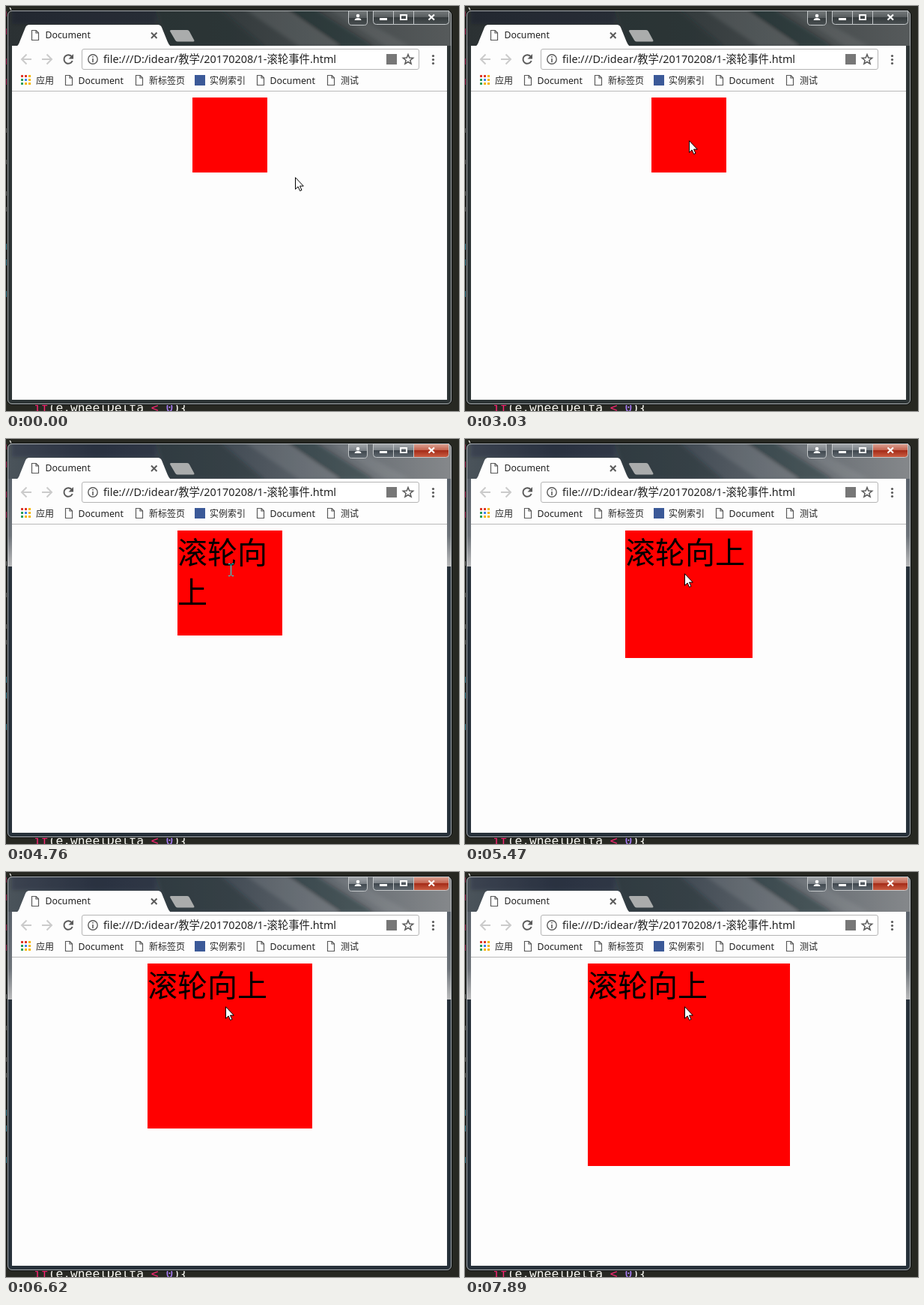
Recreate the animation shown at these times as an HTML page. Size 605 by 540 pixels, loop 8 s.

```html
<!DOCTYPE html>
<html lang="zh-CN">
<head>
<meta charset="utf-8">
<title>Wheel event</title>
<style>
html, body { margin: 0; width: 100%; height: 100%; overflow: hidden; background: #272822; }
svg { display: block; }
text { font-family: "Noto Sans", "Open Sans", "Noto Sans CJK SC", "Noto Sans CJK", sans-serif; fill: #222; white-space: pre; }
.latin { font-size: 12.3px; }
.han { font-size: 12px; }
.big { font: 40px "Noto Sans CJK SC", "Noto Sans CJK", sans-serif; fill: #000; }
.code { font: 16.3px "DejaVu Sans Mono", monospace; fill: #f8f8f2; }
.pink { fill: #f92672; }
.purple { fill: #ae81ff; }
.line { fill: none; stroke: #5a5a5a; stroke-width: 2; }
</style>
</head>
<body>
<svg width="605" height="540" viewBox="0 0 605 540">
  <defs>
    <linearGradient id="idle"><stop offset="0" stop-color="#2b3133"/><stop offset=".5" stop-color="#343b3d"/><stop offset="1" stop-color="#565a5b"/></linearGradient>
    <linearGradient id="live"><stop offset="0" stop-color="#4b545b"/><stop offset=".2" stop-color="#343e47"/><stop offset=".5" stop-color="#434c55"/><stop offset="1" stop-color="#85888b"/></linearGradient>
    <linearGradient id="side" x2="0" y2="1"><stop offset="0" stop-color="#59616a"/><stop offset=".65" stop-color="#6e747a"/><stop offset="1" stop-color="#b9babb"/></linearGradient>
    <linearGradient id="dim" x2="0" y2="1"><stop offset="0" stop-color="#777c7d"/><stop offset=".48" stop-color="#565b5d"/><stop offset=".5" stop-color="#363c3e"/><stop offset="1" stop-color="#4a5052"/></linearGradient>
    <linearGradient id="glass" x2="0" y2="1"><stop offset="0" stop-color="#a5a9ad"/><stop offset=".48" stop-color="#7a8086"/><stop offset=".5" stop-color="#40484f"/><stop offset="1" stop-color="#626a71"/></linearGradient>
    <linearGradient id="red" x2="0" y2="1"><stop offset="0" stop-color="#dca596"/><stop offset=".48" stop-color="#c4604c"/><stop offset=".5" stop-color="#a52c18"/><stop offset="1" stop-color="#cc6045"/></linearGradient>
    <clipPath id="frame"><rect x="2" y="6" width="593" height="525" rx="6"/></clipPath>
    <filter id="soft" x="-20%" width="140%"><feGaussianBlur stdDeviation="2.5"/></filter>
    <g id="page"><path d="M.5 .5H6.2L9.5 3.8V13.5H.5ZM6 .5V4H9.5" fill="#fff" stroke="#5a5a5a" stroke-width="1.2"/></g>
  </defs>

  <rect width="605" height="540" fill="#272822"/>
  <text class="code" x="-8" y="14"><tspan class="pink">a</tspan>)</text>
  <text class="code" x="37" y="541"><tspan class="pink">if</tspan>(e.wheelDelta <tspan class="pink">&lt;</tspan> <tspan class="purple">0</tspan>){</text>
  <g id="edge"></g>

  <g clip-path="url(#frame)">
    <rect id="title" x="2" y="6" width="593" height="48"/>
    <g filter="url(#soft)">
      <path d="M200 4H285L345 54H215Z" fill="#1f282d" opacity=".35"/>
      <path d="M318 4H372L445 54H392Z" fill="#fff" opacity=".09"/>
      <path d="M372 4H412L492 54H446Z" fill="#12191e" opacity=".32"/>
      <path d="M430 4H452L540 54H508Z" fill="#fff" opacity=".07"/>
      <path d="M8 4H200V24H8Z" fill="#161c20" opacity=".2"/>
    </g>
    <path id="rim" d="M2 53H8V525H589V53H595V531H2Z" fill="#2d3435"/>
    <path id="shine" d="M2 53H8V170H2ZM589 53H595V170H589Z" fill="url(#side)"/>
  </g>
  <rect x="1.5" y="5.5" width="594" height="526" rx="6.5" fill="none" stroke="#0e1112"/>
  <rect x="2.5" y="6.5" width="592" height="524" rx="5.5" fill="none" stroke="#c9cccd" stroke-opacity=".8"/>

  <g stroke="#c4c8ca" stroke-width="1">
    <path class="btn" d="M457.5 6.5H482.5V21Q482.5 25.5 478.5 25.5H461.5Q457.5 25.5 457.5 21Z"/>
    <path class="btn" d="M490.5 6.5H517.5V24.5H494.5Q490.5 24.5 490.5 20.5Z"/>
    <path class="btn" d="M517.5 6.5H544.5V24.5H517.5Z"/>
    <path id="close" d="M544.5 6.5H591.5V20.5Q591.5 24.5 587.5 24.5H544.5Z"/>
  </g>
  <g fill="#fff">
    <circle cx="470" cy="13" r="2.3"/><path d="M465.5 19Q466 16 470 16T474.5 19Z"/>
    <rect x="499" y="16" width="10" height="3"/>
  </g>
  <rect x="527" y="12" width="8" height="6" fill="none" stroke="#fff" stroke-width="2"/>
  <path d="M564.5 11.5L572 18.5M572 11.5L564.5 18.5" stroke="#fff" stroke-width="2.2"/>

  <rect x="8" y="53" width="581" height="472" fill="#fdfdfd"/>
  <path d="M14 54Q17 52 18.5 47L26 28.5Q27.5 25 31 25H203Q206.500 25 208 28.500L215.500 47Q217.500 52 220 54Z" fill="#fdfdfd"/>
  <path d="M220.500 32H242Q244 32 245 34L251.500 46Q251.500 47.500 250 47.500H229Q227 47.500 226 45.500L219 33.500Q218.500 32 220.500 32Z" fill="#aaacac"/>
  <use href="#page" x="34" y="32"/>
  <text class="latin" x="52.500" y="43">Document</text>
  <path class="line" d="M194 35.500L201.500 43M201.500 35.500L194 43" stroke-width="1.7"/>

  <path class="line" d="M34 71H21.500M27.500 64.500L21 71L27.500 77.500" style="stroke:#cbcbcb"/>
  <path class="line" d="M48 71H60.500M54.500 64.500L61 71L54.500 77.500" style="stroke:#cbcbcb"/>
  <path class="line" d="M87.500 67A5.800 5.800 0 1 0 88.700 73"/>
  <path d="M90 64V70.500H83.500Z" fill="#5a5a5a"/>
  <rect x="101.500" y="57.500" width="450" height="27" rx="2.500" fill="#fff" stroke="#b5b5b5"/>
  <circle cx="116" cy="71" r="6.200" fill="none" stroke="#5a5a5a" stroke-width="1.400"/>
  <path d="M116 67V68.600M116 70V75" stroke="#5a5a5a" stroke-width="1.600"/>
  <text x="130" y="76" font-size="14.400">file:///D:/idear/教学/20170208/1-滚轮事件.html</text>
  <rect x="508" y="64" width="14" height="14" fill="#777"/>
  <path id="star" fill="none" stroke="#5a5a5a" stroke-width="1.500"/>
  <g fill="#5a5a5a"><circle cx="570.500" cy="66.500" r="1.600"/><circle cx="570.500" cy="71.500" r="1.600"/><circle cx="570.500" cy="76.500" r="1.600"/></g>

  <g id="apps"></g>
  <text class="han" x="40" y="104">应用</text>
  <use href="#page" x="79" y="92"/><text class="latin" x="96.500" y="104">Document</text>
  <use href="#page" x="173" y="92"/><text class="han" x="191" y="104">新标签页</text>
  <rect x="252" y="92" width="14" height="14" fill="#3b5998"/><text class="han" x="272" y="104">实例索引</text>
  <use href="#page" x="335" y="92"/><text class="latin" x="352.500" y="104">Document</text>
  <use href="#page" x="429" y="92"/><text class="han" x="447" y="104">测试</text>
  <path d="M8 113.500H589" stroke="#b9b9b9"/>

  <rect id="box" y="122" fill="#f00"/>
  <text id="row1" class="big" y="166"></text>
  <text id="row2" class="big" y="219"></text>
  <path id="arrow" d="M.5 .7V16.300L4.100 12.900L6.600 18.500L9 17.400L6.500 12.100H11.300Z" fill="#fff" stroke="#000"/>
  <path id="beam" d="M297 166.500H299.500M301.500 166.500H304M300.500 167V182M297 182.500H299.500M301.500 182.500H304" fill="none" stroke="#0ff"/>
</svg>
<script>
const LOOP = 8000, ACTIVE = 4290, LABEL = "滚轮向上";
// [start ms, value...]
const sizes = [[0, 100], [4290, 120], [4760, 140], [5470, 170], [6000, 190], [6620, 220], [7210, 250], [7770, 260], [7890, 270]];
const moves = [[0, 386, 228], [120, 364, 212], [270, 334, 196], [390, 313, 185], [540, 300, 179], [3030, 299, 179],
  [3460, 299, 177], [3580, 299, 176], [4170, 299, 175], [5470, 293, 179]];

const $ = id => document.getElementById(id);
const set = (el, attrs) => { for (const k in attrs) el.setAttribute(k, attrs[k]); };
const at = (list, t) => list.filter(s => s[0] <= t).pop();
const dot = (parent, x, y, w, h, fill) => {
  const el = document.createElementNS("http://www.w3.org/2000/svg", "rect");
  set(el, { x, y, width: w, height: h, fill });
  parent.append(el);
};

["#e0392b", "#e0392b", "#f4b400", "#2e9e58", "#4285f4", "#f4b400", "#2e9e58", "#f4b400", "#f4b400"]
  .forEach((c, i) => dot($("apps"), 20 + i % 3 * 5, 92 + (i / 3 | 0) * 5, 3, 3, c));
[30, 70, 97].forEach(y => dot($("edge"), 0, y, 1, 8, "#a02450"));
[163, 205, 247, 268].forEach(y => dot($("edge"), 0, y, 1, 6, "#6b6c66"));
[317, 338, 380].forEach(y => dot($("edge"), 0, y, 1, 8, "#3e8494"));

const points = Array.from({ length: 10 }, (_, i) => {
  const r = i % 2 ? 3 : 7, a = i * Math.PI / 5;
  return [537 + r * Math.sin(a), 71.5 - r * Math.cos(a)];
});
set($("star"), { d: "M" + points.join("L") + "Z" });

function draw(now) {
  const t = now % LOOP, live = t >= ACTIVE;
  const size = at(sizes, t)[1], x = 299 - size / 2;
  const fit = Math.floor(size / 40);
  const [, cx, cy] = at(moves, t);
  const beam = live && t < 5470;

  set($("box"), { x, width: size, height: size });
  set($("row1"), { x });
  set($("row2"), { x });
  $("row1").textContent = live ? LABEL.slice(0, fit) : "";
  $("row2").textContent = live ? LABEL.slice(fit) : "";
  set($("arrow"), { transform: `translate(${cx} ${cy})`, visibility: beam ? "hidden" : "visible" });
  set($("beam"), { visibility: beam ? "visible" : "hidden" });

  set($("title"), { fill: live ? "url(#live)" : "url(#idle)" });
  set($("rim"), { fill: live ? "#27313a" : "#2d3435" });
  set($("shine"), { visibility: live ? "visible" : "hidden" });
  document.querySelectorAll(".btn").forEach(b => set(b, { fill: live ? "url(#glass)" : "url(#dim)" }));
  set($("close"), { fill: live ? "url(#red)" : "url(#dim)" });
}

const start = performance.now();
function tick() {
  draw(performance.now() - start);
  requestAnimationFrame(tick);
}
tick();
</script>
</body>
</html>
```
